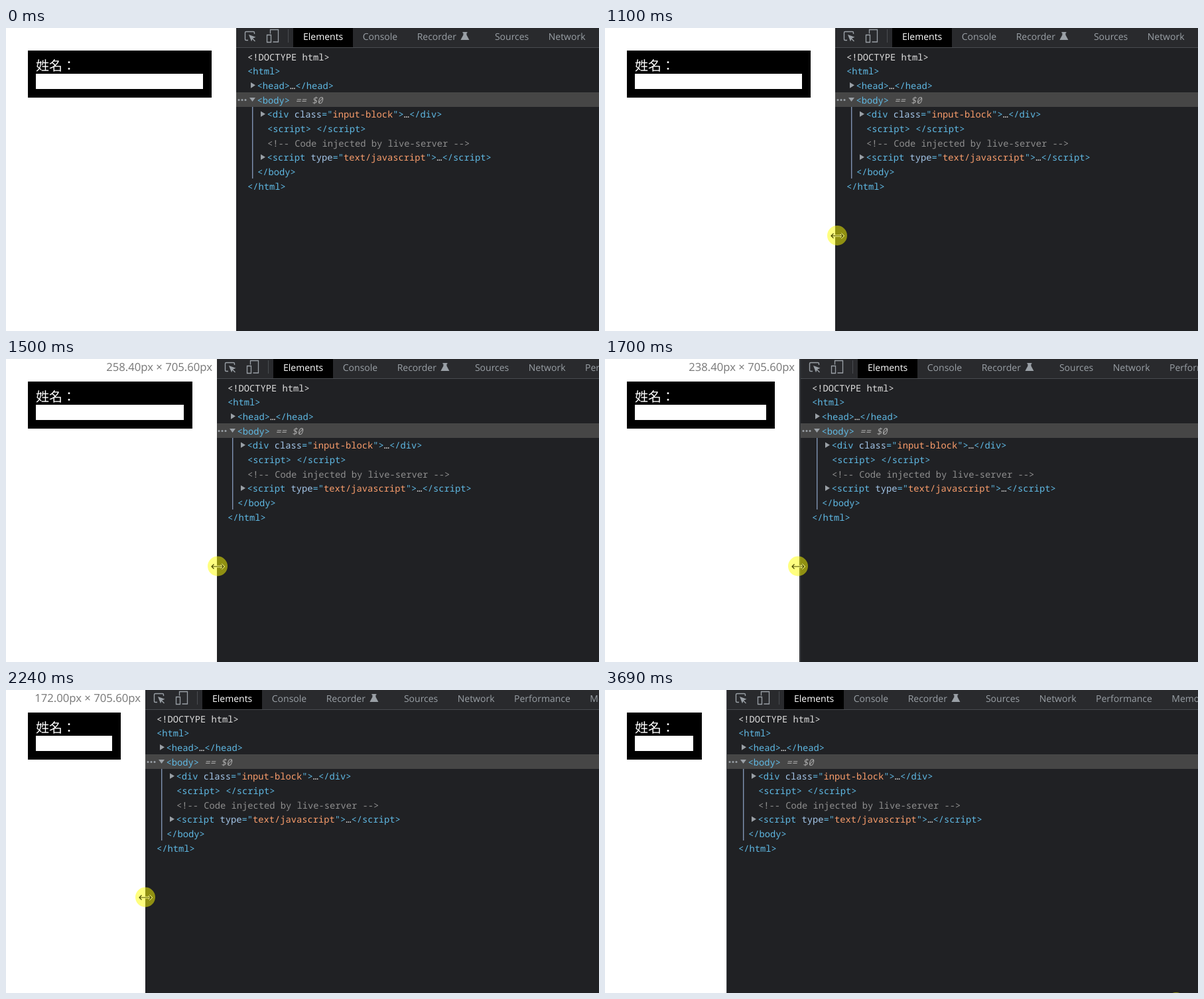
Write an HTML page with a canvas that moves like this. It is 894 px wide and 457 px high and loops after 3.76 s.

```html
<!DOCTYPE html>
<html lang="zh-Hant">
<head>
<meta charset="utf-8">
<title>Resizable input block</title>
<style>
  html, body { margin: 0; width: 100%; height: 100%; overflow: hidden; background: #fff; }
  canvas { display: block; width: 894px; height: 457px; }
</style>
</head>
<body>
<canvas id="stage" width="894" height="457"></canvas>
<script>
const ctx = document.getElementById('stage').getContext('2d');
const W = 894, H = 457, LOOP = 3760;
const UI = '"Open Sans", "Noto Sans", sans-serif';
const CODE = '13.75px "Noto Sans Mono", monospace';
const CJK = '300 20px "Noto Sans CJK TC", "Noto Sans CJK", sans-serif';
const C = {
  panel: '#202124', bar: '#292a2d', line: '#494c50', row: '#464646', icon: '#9aa0a6',
  tag: '#5fb9e4', attr: '#a5c7ea', value: '#fb9e6c', note: '#8e8e8e', plain: '#dedede'
};

// The page edge is dragged left; the panel content follows it loosely.
const DRAG = [
  { t: 1160, edge: 347, panel: 347 },
  { t: 1500, edge: 318, panel: 317 },
  { t: 1700, edge: 293, panel: 295 },
  { t: 2030, edge: 248, panel: 247 },
  { t: 2390, edge: 183, panel: 184 }
];
const LABEL_END = 3310;

const TABS = ['Elements', 'Console', 'Recorder', 'Sources', 'Network', 'Performance', 'Memory'];

const tag = s => [s, C.tag];
const plain = s => [s, C.plain];
const open = (name, attr, value) =>
  [tag(`<${name} `), [attr, C.attr], tag('="'), [value, C.value], tag('">'), plain('…'), tag(`</${name}>`)];

const TREE = [
  { depth: 0, parts: [plain('<!DOCTYPE html>')] },
  { depth: 0, parts: [tag('<html>')] },
  { depth: 1, arrow: 'right', parts: [tag('<head>'), plain('…'), tag('</head>')] },
  { depth: 1, arrow: 'down', parts: [tag('<body>'), [' == $0', '#a8a8a8', 'italic ']] },
  { depth: 2, arrow: 'right', parts: open('div', 'class', 'input-block') },
  { depth: 2, parts: [tag('<script> <\/script>')] },
  { depth: 2, parts: [['<!-- Code injected by live-server -->', C.note]] },
  { depth: 2, arrow: 'right', parts: open('script', 'type', 'text/javascript') },
  { depth: 1, parts: [tag('</body>')] },
  { depth: 0, parts: [tag('</html>')] }
];

const clamp = u => Math.min(1, Math.max(0, u));
const mix = (a, b, u) => a + (b - a) * u;
const easeIn = u => u * u;
const easeOut = u => 1 - (1 - u) ** 2;
const linear = u => u;

function glide(t, t0, t1, from, to, ease = linear) {
  const u = ease(clamp((t - t0) / (t1 - t0)));
  return from.map((v, i) => mix(v, to[i], u));
}

function split(t) {
  const i = Math.max(1, DRAG.findIndex(k => t < k.t));
  const past = t >= DRAG[DRAG.length - 1].t;
  const [a, b] = past ? DRAG.slice(-2) : DRAG.slice(i - 1, i + 1);
  return glide(t, a.t, b.t, [a.edge, a.panel], [b.edge, b.panel]).map(Math.round);
}

function hand(t, edge, panel) {
  if (t < 30) return null;
  if (t < 760) return glide(t, 30, 530, [771, 468], [370, 332], easeOut);
  if (t < 1160) return glide(t, 760, 960, [370, 332], [350, 313]);
  if (t < 2390) return [2 * edge - panel, 312.5];
  if (t < 2690) return glide(t, 2390, 2600, [183, 313], [140, 313]);
  if (t < 2890) return glide(t, 2690, 2850, [140, 313], [152, 331]);
  if (t < 3010) return glide(t, 2890, 2980, [152, 331], [505, 414], easeIn);
  return t >= 3690 ? [861, 471] : null;
}

function box(x, y, w, h, color) {
  ctx.fillStyle = color;
  ctx.fillRect(x, y, w, h);
}

function text(s, x, y, font, color, align = 'left') {
  ctx.font = font;
  ctx.textAlign = align;
  ctx.fillStyle = color;
  ctx.fillText(s, x, y);
  return ctx.measureText(s).width;
}

function fill(path, color) {
  ctx.fillStyle = color;
  ctx.fill(new Path2D(path));
}

function stroke(path, color, width) {
  ctx.strokeStyle = color;
  ctx.lineWidth = width;
  ctx.stroke(new Path2D(path));
}

function disc(x, y, r, color) {
  ctx.beginPath();
  ctx.arc(x, y, r, 0, Math.PI * 2);
  ctx.fillStyle = color;
  ctx.fill();
}

function at(x, y, paint) {
  ctx.save();
  ctx.translate(x, y);
  paint();
  ctx.restore();
}

function drawPage(edge, labelled) {
  box(0, 0, W, H, '#fff');
  box(33, 34, edge - 70, 71, '#000');
  text('姓名：', 45, 64, CJK, '#fff');
  box(45, 69, edge - 95, 23, '#fff');
  if (labelled) {
    const size = ((edge + 5) / 1.25).toFixed(2);
    text(`${size}px × 705.60px`, edge - 7, 18, `16.7px ${UI}`, '#777', 'right');
  }
}

function drawFlask() {
  fill('M3 0h7v1.5h-1v3l4 7.5h-13l4-7.5v-3h-1z', C.icon);
}

function drawToolbar() {
  box(0, 0, W, 29, C.bar);
  box(0, 29, W, 1, C.line);
  box(86, 0, 90, 29, '#000');
  box(78, 2, 1, 20, C.line);

  stroke('M18 18.5h-3q-1.5 0-1.5-1.5v-10q0-1.5 1.5-1.5h11q1.5 0 1.5 1.5v2M24 15.5l4.5 4.5', C.icon, 1.4);
  fill('M19 10l10.5 3.8-4.5 2-2 4.5z', C.icon);
  stroke('M51.5 8.5v-6h12v18.5h-8M46.5 10.5h6v11h-6z', C.icon, 1.3);

  let x = 101;
  TABS.forEach((name, i) => {
    x += text(name, x, 18, `14px ${UI}`, i ? C.icon : '#fff') + 29.5;
    if (name === 'Recorder') {
      at(x - 23, 6, drawFlask);
      x += 28.5;
    }
  });
}

function drawTree() {
  box(0, 97, W, 22, C.row);
  box(24, 119, 1.4, 108, '#8094b3');
  for (let i = 0; i < 3; i++) disc(4 + 5 * i, 108.5, 1.5, C.icon);

  TREE.forEach(({ depth, arrow, parts }, i) => {
    const y = 44 + i * 21.67;
    let x = 17 + depth * 15 - (arrow ? 0.5 : 0);
    at(x - 9.5, y - 1, () => {
      if (arrow === 'right') fill('M0-4.3l7 4.3-7 4.3z', C.icon);
      if (arrow === 'down') fill('M-2-3h9l-4.5 6z', C.icon);
    });
    for (const [s, color, style = ''] of parts) {
      x += text(s, x, Math.round(y + 4.7), style + CODE, color);
    }
  });
}

function drawPanel(edge, x) {
  ctx.save();
  ctx.beginPath();
  ctx.rect(edge, 0, W - edge, H);
  ctx.clip();
  box(edge, 0, W, H, C.panel);
  ctx.translate(x, 0);
  box(-1, 0, 1, H, C.line);
  drawToolbar();
  drawTree();
  ctx.restore();
}

function drawHand(x, y, resizing) {
  disc(x, y, 15, 'rgba(255,255,0,0.5)');
  at(x, y, () => {
    if (resizing) {
      const arrows = 'M-9 .5h18M-5.5-3l-3.5 3.5 3.5 3.5M5.5-3l3.5 3.5-3.5 3.5';
      stroke(arrows, '#ffff80', 3);
      stroke(arrows, '#4a4a00', 1.2);
    } else {
      const arrow = 'M0 0v16l3.7-3.4 2.5 5.7 2.4-1.1-2.4-5.5 5.1-.2z';
      fill(arrow, '#fff');
      stroke(arrow, '#000', 1);
    }
  });
}

function draw(t) {
  const [edge, panel] = split(t);
  drawPage(edge, edge < DRAG[0].edge && t < LABEL_END);
  drawPanel(edge, panel);
  const spot = hand(t, edge, panel);
  if (spot) drawHand(...spot, t >= 900 && t < 2800);
}

ctx.textRendering = 'geometricPrecision';
const start = performance.now();
function tick() {
  draw((performance.now() - start) % LOOP);
  requestAnimationFrame(tick);
}
tick();
</script>
</body>
</html>
```
